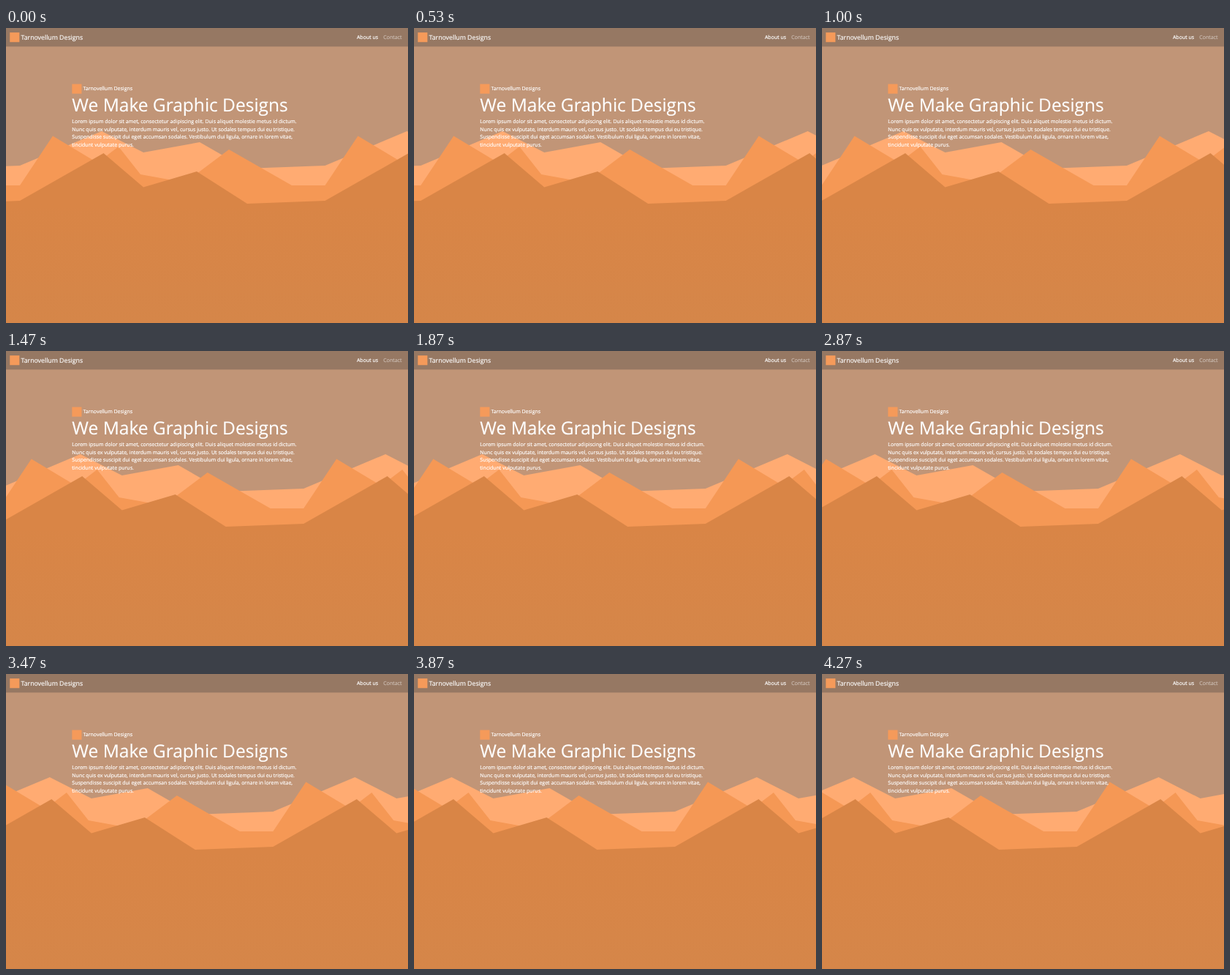
Write an HTML page that moves like this. It is 550 px wide and 403 px high and loops after 4340 ms.

```html
<!DOCTYPE html>
<html lang="en">
<head>
<meta charset="utf-8">
<title>We Make Graphic Designs</title>
<style>
  html, body { margin: 0; width: 100%; height: 100%; overflow: hidden; background: #c19577; }
  svg { display: block; width: 550px; height: 403px; }
  text {
    font: 16px "Open Sans", sans-serif; text-rendering: geometricPrecision;
    fill: #fff; stroke: #fff; stroke-width: .4px;
  }
  .brand { font-size: 20px; }
  .title { font-size: 56px; }
  .muted { opacity: .5; }
</style>
</head>
<body>
<svg viewBox="0 0 550 403">
  <defs>
    <linearGradient id="slope" gradientUnits="userSpaceOnUse" x1="0" y1="240" x2="0" y2="403">
      <stop stop-color="#d98546"/>
      <stop offset="1" stop-color="#d58649"/>
    </linearGradient>
    <rect id="logo" width="30" height="30" fill="#f59a5a"/>
  </defs>

  <g id="range"></g>

  <!-- The page is laid out at full size and shown scaled down -->
  <g transform="scale(.4375)">
    <rect width="1258" height="58" fill="#967863"/>
    <use href="#logo" x="12" y="14"/>
    <text class="brand" x="47" y="36">Tarnovellum Designs</text>
    <text x="1097" y="34.5">About us</text>
    <text class="muted" x="1180" y="34.5">Contact</text>

    <g transform="translate(206.5 175)">
      <use href="#logo"/>
      <text x="34.5" y="19">Tarnovellum Designs</text>
      <text class="title" y="85.5">We Make Graphic Designs</text>
      <text id="intro" y="99"></text>
    </g>
  </g>
</svg>
<script>
  const LOOP = 4340, PERIOD = 417.5, STEP = 1.395;
  const range = document.getElementById('range');
  const intro = document.getElementById('intro');

  function add(parent, tag, attrs) {
    const node = document.createElementNS('http://www.w3.org/2000/svg', tag);
    for (const name in attrs) node.setAttribute(name, attrs[name]);
    return parent.appendChild(node);
  }

  // Repeats the corner points of one period along the stage and fills down to the bottom
  function ridge(fill, corners) {
    const points = corners.split(' ').map(p => p.split(',').map(Number));
    const line = [-1, 0, 1, 2].flatMap(k => points.map(([x, y]) => [x + k * PERIOD, y]));
    add(range, 'path', { fill, d: `M${line.join('L')}V403H${line[0][0]}Z` });
  }

  ridge('#ffab72', '19,188 131,141 188,170 265,156 328,192');
  ridge('#f59855', '19,215 64,147.5 125,184 154,162 184,200 245,211 305,166 391,215');
  ridge('url(#slope)', '19,236 133.5,171 188,217.5 261,196 330,240');

  const lines = [
    'Lorem ipsum dolor sit amet, consectetur adipiscing elit. Duis aliquet molestie metus id dictum.',
    'Nunc quis ex vulputate, interdum mauris vel, cursus justo. Ut sodales tempus dui eu tristique.',
    'Suspendisse suscipit dui eget accumsan sodales. Vestibulum dui ligula, ornare in lorem vitae,',
    'tincidunt vulputate purus.'
  ];
  for (const line of lines) add(intro, 'tspan', { x: 0, dy: '1.5em' }).textContent = line;

  // The range advances 15 times a second, pausing for one step near the start
  function draw(time) {
    const ticks = Math.floor(time % LOOP / 10);
    const n = Math.min(64, Math.ceil((ticks + 0.5) * 0.15) - 1);
    const moved = n < 3 ? n : n - 1;
    range.setAttribute('transform', `translate(${-moved * STEP})`);
  }

  const start = performance.now();
  function frame() {
    draw(performance.now() - start);
    requestAnimationFrame(frame);
  }
  frame();
</script>
</body>
</html>
```
